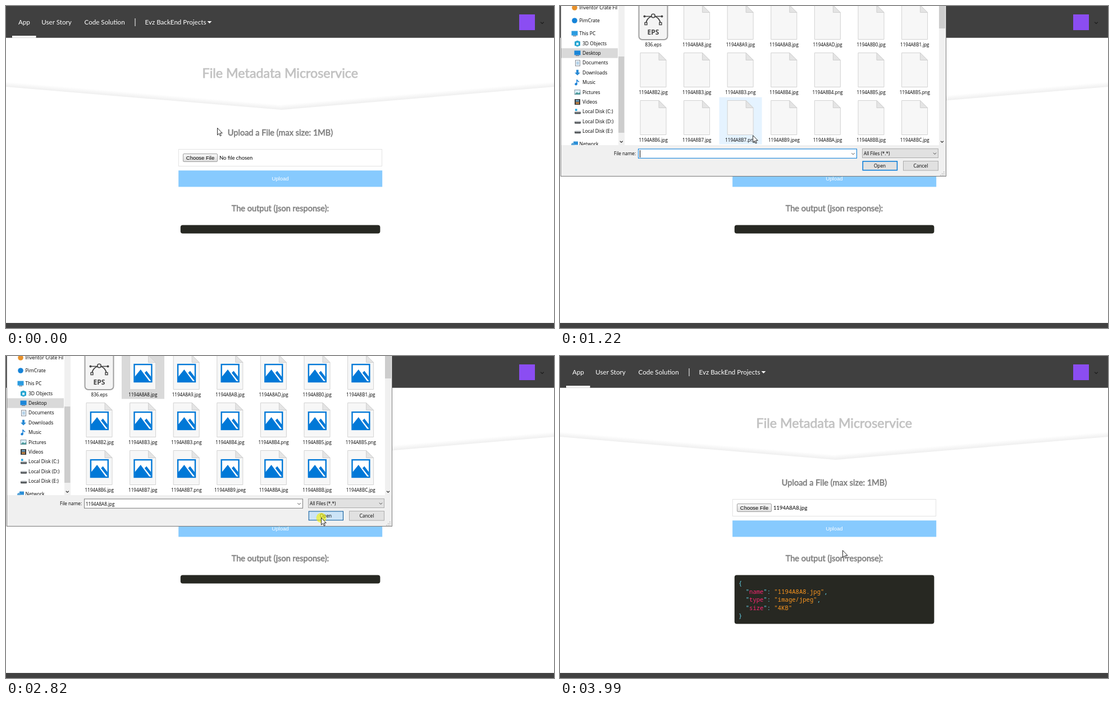
An HTML page that plays this animation: 976x574 px, repeating every 4690 ms.

```html
<!DOCTYPE html>
<html lang="en">
<head>
<meta charset="utf-8">
<title>File Metadata Microservice</title>
<style>
html, body { margin: 0; width: 100%; height: 100%; overflow: hidden; background: #fff; }
svg { display: block; width: 976px; height: 574px; }
text { white-space: pre; }
.lato { font-family: Lato, sans-serif; }
.arial { font-family: "Liberation Sans", Arial, sans-serif; }
.ui { font-family: "Open Sans", "Noto Sans", sans-serif; }
.mono { font-family: "Noto Sans Mono", "DejaVu Sans Mono", monospace; }
.mid { text-anchor: middle; }
</style>
</head>
<body>
<svg id="stage" viewBox="0 0 976 574"></svg>
<script>
const LOOP = 4690;
const BLUE = '#0078d7';

const rect = (x, y, w, h, fill, extra = '') =>
  `<rect x="${x}" y="${y}" width="${w}" height="${h}" fill="${fill}" ${extra}/>`;
const box = (x, y, w, h, fill, stroke, extra = '') =>
  rect(x + .5, y + .5, w - 1, h - 1, fill, `stroke="${stroke}" ${extra}`);
const path = (d, fill, extra = '') => `<path d="${d}" fill="${fill}" ${extra}/>`;
const line = (d, stroke, width = 1) => path(d, 'none', `stroke="${stroke}" stroke-width="${width}"`);
const dot = (x, y, r, fill, extra = '') => `<circle cx="${x}" cy="${y}" r="${r}" fill="${fill}" ${extra}/>`;
const text = (x, y, str, size, cls, fill = '#000', extra = '') =>
  `<text x="${x}" y="${y}" font-size="${size}" class="${cls}" fill="${fill}" ${extra}>${str}</text>`;
const group = (id, body, extra = '') => `<g id="${id}" ${extra}>${body}</g>`;
const heavy = (color, width) => `stroke="${color}" stroke-width="${width}"`;
const chevron = (x, y, s, color, width = 1) =>
  line(`M${x - s} ${y - s / 2}l${s} ${s}l${s} ${-s}`, color, width);

function navBar() {
  const items = [[22, 'App'], [63.3, 'User Story'], [139.5, 'Code Solution'], [247.5, 'Evz BackEnd Projects']];
  return rect(0, 0, 976, 56.7, '#404040') +
    items.map(([x, label]) => text(x, 32.5, label, 11.64, 'lato', '#fff')).join('') +
    rect(11, 53, 42.5, 3.7, '#fff') + rect(229.5, 22, 1, 14, '#fff') +
    path('M358.6 27h7.8l-3.9 4z', '#fff') +
    rect(914, 15, 28, 28, '#8b4df2') + chevron(955, 30, 2.8, '#1c1c1c', 1.3);
}

function banner() {
  const shade = (x0, y0, x1, y1, dx) =>
    path(`M${x0} ${y0}L${x1} ${y1}v-10L${x0} ${y0 - 10}z`, `url(#${dx})`);
  const grad = (id, x, y, nx) =>
    `<linearGradient id="${id}" gradientUnits="userSpaceOnUse" x1="${x}" y1="${y}" x2="${x + nx}" y2="${y - 9}">
     <stop offset="0" stop-color="#efefef"/><stop offset="1" stop-color="#fff"/></linearGradient>`;
  return grad('shadeL', 0, 144, .75) + grad('shadeR', 976, 144, -.75) +
    shade(0, 144, 491, 185, 'shadeL') + shade(491, 185, 976, 144, 'shadeR') +
    text(488.3, 127.5, 'File Metadata Microservice', 23.3, 'lato mid', '#c2c2c2', heavy('#c2c2c2', .75));
}

function json() {
  const cyan = '#66d9ef';
  const span = (s, c) => `<tspan fill="${c}">${s}</tspan>`;
  const pair = (key, value, end) =>
    '  ' + span('"', cyan) + span(key, '#f92672') + span('": ', cyan) + span(`"${value}"`, '#fd971f') + span(end, cyan);
  const rows = [span('{', cyan), pair('name', '1194A8A8.jpg', ','), pair('type', 'image/jpeg', ','),
    pair('size', '4KB', ''), span('}', cyan)];
  return rows.map((row, i) => text(318, 409 + i * 14.5, row, 10.58, 'mono')).join('');
}

function form() {
  const grey = '#808080';
  const heading = (y, label) => text(488.5, y, label, 14.55, 'lato mid', grey, heavy(grey, .6));
  return heading(230.5, 'Upload a File (max size: 1MB)') +
    box(307, 255, 363, 31, '#fff', '#e3e3e3') +
    `<linearGradient id="face" x2="0" y2="1"><stop stop-color="#f8f8f8"/><stop offset="1" stop-color="#dcdcdc"/></linearGradient>` +
    box(315, 263, 62, 15, 'url(#face)', '#a0a0a0', 'id="choose" rx="1.5"') +
    text(346, 274, 'Choose File', 9.45, 'arial mid') +
    text(380, 274, '', 9.45, 'lato', '#000', 'id="chosen"') +
    rect(307.2, 293.2, 363, 29.2, '#87cafe', 'id="upload"') +
    text(488.5, 310.7, 'Upload', 9.45, 'arial mid', '#fff') +
    heading(366, 'The output (json response):') +
    rect(310.8, 390.5, 355.6, 14.9, '#272822', 'id="output" rx="4"') + group('json', json());
}

const tileX = col => 128.4 + col * 77.6;
const tileY = row => -8 + row * 85.3;

function pageIcon(x, y) {
  return path(`M${x} ${y}h33l13 13v48h-46z`, '#f7f7f7', 'stroke="#d2d2d2"') +
    path(`M${x + 33} ${y}v13h13z`, '#e4e4e4', 'stroke="#cfcfcf"');
}

function picture(x, y) {
  return rect(x, y, 33.3, 33.3, BLUE) + rect(x + 2.4, y + 2.4, 28.5, 28.5, '#fff') +
    path(`M${x + 2} ${y + 23}l10.5-13l15.5 21h-26z`, BLUE) +
    path(`M${x + 19.5} ${y + 16}l3.5-3.5l8 10.5v7.5z`, BLUE);
}

function epsIcon() {
  const ink = '#444';
  const node = (x, y) => rect(x - 2, y - 2, 4, 4, '#f4f4f4', `stroke="${ink}" stroke-width="1.4"`);
  return box(140, -6, 52, 66.5, '#f4f4f4', '#a0a0a0', 'rx="6" stroke-width="2"') +
    line('M150 18.5H182M153 31C154 24 159 18.5 166 18.5S178 24 179 31', ink, 1.7) +
    dot(150.5, 18.5, 2, ink) + dot(181.5, 18.5, 2, ink) +
    node(153, 31.5) + node(179, 31.5) +
    dot(166, 17.5, 3.2, '#f4f4f4', `stroke="${ink}" stroke-width="1.6"`) +
    text(166, 51, 'EPS', 12, 'ui mid', ink, 'font-weight="700"');
}

function fileGrid() {
  const names = 'A8 A9 AB AD B0 B1 B2 B3 B3.png B4 B4.png B5 B5.png B6 B7 B7.png B9.jpeg BA BB BC'.split(' ')
    .map(n => '1194A8' + (n.includes('.') ? n : n + '.jpg'));
  let icons = epsIcon(), pictures = '';
  ['836.eps', ...names].forEach((name, i) => {
    const col = i % 7, row = Math.floor(i / 7);
    const x = 143 + col * 77.6, y = -1.5 + row * 85;
    if (i) {
      icons += pageIcon(x, y);
      pictures += picture(x + 6.7, y + 15.4);
    }
    icons += text(x + 23.2, y + 73.6, name, 8.05, 'ui mid');
  });
  return rect(tileX(1), tileY(0), 76, 84.5, '#cce8ff', 'id="selected"') +
    rect(0, 0, 76, 84, '#e5f3ff', 'id="hover"') + icons + group('pictures', pictures);
}

function sidebar() {
  const icons = {
    ball: (x, y, c) => dot(x, y, 4.8, c),
    screen: (x, y, c) => rect(x - 5.5, y - 4.5, 11, 8, c) + rect(x - 3, y + 4, 6, 1, '#667'),
    cube: (x, y, c) => path(`M${x - 5} ${y - 3}l5-2l5 2v7l-5 2l-5-2z`, c) + rect(x - 2, y - 1, 4, 4, '#d8f2fc'),
    sheet: (x, y) => box(x - 4, y - 5, 9, 11, '#fff', '#7c8794') + line(`M${x - 2} ${y - 1.5}h5m-5 2h5m-5 2h5`, '#4a90c8', .8),
    arrow: (x, y, c) => path(`M${x - 2} ${y - 5}h4v5h3l-5 5l-5-5h3z`, c),
    note: (x, y, c) => line(`M${x - 1} ${y + 3}v-8q1 3 4 4`, c, 1.5) + dot(x - 2.5, y + 3, 2.2, c),
    photo: (x, y, c) => box(x - 5.5, y - 4.5, 11, 9, '#d9effa', '#8a97a0') + path(`M${x - 5} ${y + 4}l4-4l3 2l3-2v4z`, c),
    film: (x, y, c) => rect(x - 5, y - 5, 10, 10, '#3a3a3a') + rect(x - 3, y - 3.5, 6, 3, c) + rect(x - 3, y + .5, 6, 3, '#c98a4a'),
    disk: (x, y) => rect(x - 5, y, 11, 4, '#55595c', 'rx="1"') + rect(x - 4, y - 1, 9, 2, '#c8ccd0'),
    system: (x, y, c) => icons.disk(x, y) + rect(x - 4, y - 5, 3.5, 3.5, c),
    net: (x, y, c) => rect(x - 2, y - 4.5, 8, 6, c) + dot(x - 3, y + 1, 3, '#5aa4d8')
  };
  const rows = [
    ['Inventor Crate Fil', 3, 'ball', '#e8912a', 1], ['PimCrate', 26, 'ball', '#1583d8', 1],
    ['This PC', 49, 'screen', '#2b9be0', 1], ['3D Objects', 66.5, 'cube', '#27a5d0'],
    ['Desktop', 84, 'screen', '#1b86d8'], ['Documents', 101.3, 'sheet'],
    ['Downloads', 118.8, 'arrow', '#2a8ad4'], ['Music', 136.2, 'note', '#1a80d6'],
    ['Pictures', 153.6, 'photo', '#4a9a9a'], ['Videos', 171, 'film', '#6a9fc0'],
    ['Local Disk (C:)', 188.4, 'system', '#21a6e0'], ['Local Disk (D:)', 205.8, 'disk'],
    ['Local Disk (E:)', 223.2, 'disk'], ['Network', 246, 'net', '#2b8fd8', 1]
  ];
  return rect(2, 75.3, 101, 17.4, '#d9d9d9') +
    rows.map(([label, y, icon, color, top]) =>
      icons[icon](top ? 26 : 31, y, color) + text(top ? 34.5 : 40, y + 3, label, 8.5, 'ui')).join('') +
    rect(104, 0, 11, 248, '#f0f0f0') + rect(104, 90, 10.5, 136, '#cdcdcd') + chevron(109.3, 242, 2.5, '#333', 1.2);
}

function controls() {
  return text(96, 266, 'File name:', 8.2, 'ui') +
    box(139, 254.4, 390, 17.4, '#fff', BLUE, 'id="field"') + chevron(522, 263.5, 2.6, '#444') +
    text(142, 266.5, '1194A8A8.jpg', 8.05, 'ui', '#000', 'id="typed"') +
    rect(142, 257, 1, 13, '#000', 'id="caret"') +
    box(538, 254, 136, 17, '#e1e1e1', '#adadad') + chevron(667.5, 263, 2.6, '#444') +
    text(541, 266, 'All Files (*.*)', 8.2, 'ui') +
    rect(539.3, 276.9, 61.2, 15.8, '#e1e1e1', `stroke="${BLUE}" stroke-width="1.5" id="open"`) +
    text(569.5, 288, 'Open', 8.25, 'ui mid') +
    box(611, 276, 63, 17.6, '#e1e1e1', '#adadad') + text(642.5, 288, 'Cancel', 8.35, 'ui mid') +
    [[0, 0], [0, 3], [0, 6], [-3, 3], [-3, 6], [-6, 6]].map(([x, y]) => rect(683 + x, 295 + y, 1.5, 1.5, '#b5b5b5')).join('');
}

function dialog() {
  const blanks = rect(96, 257, 40, 11, '#fff') + rect(139, 254, 390, 18, '#fff') +
    rect(538, 254, 136, 17, '#fff') + rect(538, 275, 64, 19, '#fff') +
    rect(610, 275, 64, 19, '#fff') + rect(674, 291, 12, 12, '#fff');
  const scroll = rect(675, 0, 11.5, 248, '#f0f0f0') + rect(675, 0, 11, 40, '#cdcdcd') + chevron(680.5, 242, 2.5, '#333', 1.2);
  return rect(1, -2, 687, 306, '#fff') + group('sidebar', sidebar()) + group('files', fileGrid() + scroll) +
    rect(2, 248, 685, 55, '#f0f0f0') + group('blanks', blanks) + group('controls', controls()) +
    box(1, -3, 687, 307, 'none', '#777');
}

document.getElementById('stage').innerHTML =
  rect(0, 0, 976, 574, '#fff') + navBar() + banner() + form() + rect(0, 565, 976, 9, '#404040') +
  group('dialog', dialog()) +
  group('cursor', dot(.5, .5, 9, '#f5f000', 'id="click" fill-opacity=".62"') +
    path('M.5 .5V13L3.4 10.3L5.4 14.7L7.3 13.9L5.4 9.6H9.2Z', '#fff', 'stroke="#111" stroke-width=".9"'));

const el = Object.fromEntries([...document.querySelectorAll('svg [id]')].map(n => [n.id, n]));
const show = (name, on) => el[name].setAttribute('visibility', on ? 'inherit' : 'hidden');
const set = (name, attrs) => Object.entries(attrs).forEach(([k, v]) => el[name].setAttribute(k, v));

const ticks = [0, 70, 140, 220, 290, 360, 440, 510, 830, 900, 980, 1060, 1140, 1220, 1300,
  1370, 1450, 1530, 1610, 1680, 1750, 1820, 1900, 1980, 2060, 2130, 2210, 2280, 2360,
  2440, 2520, 2600, 2670, 2740, 2820, 2900, 2990, 3140, 3220, 3300, 3370, 3450, 3520, 3600,
  3680, 3760, 3840, 3910, 3990];

// Pointer path: time, x, y.
const route = [[0, 376, 217], [510, 357, 268], [1140, 357, 268], [1610, 275.5, 46], [1820, 262, 43],
  [1900, 262, 43], [2060, 355.5, 223], [2360, 432, 252], [2740, 561, 288], [2900, 561, 288],
  [2990, 560, 292], [3140, 560, 292], [3370, 528, 331], [3600, 506, 312], [3760, 506, 312], [3990, 503, 346]];

function pointerAt(t) {
  const i = route.findIndex(p => p[0] > t);
  if (i < 0) return route[route.length - 1].slice(1);
  const [a, b] = [route[i - 1], route[i]];
  const k = (t - a[0]) / (b[0] - a[0]);
  return [1, 2].map(n => a[n] + (b[n] - a[n]) * k);
}

function draw(time) {
  const t = ticks.filter(v => v <= time).pop();
  const within = (a, b) => t >= a && t < b;
  const [x, y] = pointerAt(t);
  set('cursor', { transform: `translate(${x} ${y})` });
  show('click', within(440, 510) || within(1820, 1900) || within(2740, 2900) || within(3600, 3760));

  const open = within(830, 2900);
  show('dialog', open);
  show('blanks', within(900, 980));
  show('controls', t >= 980 && open);
  show('sidebar', t >= 1060 && open);
  show('files', t >= 1140 && open);
  show('pictures', t >= 1370 && open);

  const picked = t >= 1820, pressed = t >= 2740;
  const col = Math.floor((x - tileX(0)) / 77.6), row = Math.floor((y - tileY(0)) / 85.3);
  const overTile = y < 247 && col >= 0 && col < 7 && !(picked && col === 1 && row === 0);
  show('hover', within(1140, 2900) && overTile);
  set('hover', { x: tileX(col), y: tileY(row) });
  show('selected', picked && open);
  set('selected', { fill: pressed ? '#d9d9d9' : '#cce8ff', stroke: pressed ? 'none' : '#99d1ff' });
  show('typed', picked && open);
  show('caret', within(980, 1820));
  set('field', { stroke: t < 1900 ? BLUE : '#7a7a7a' });
  set('open', pressed ? { fill: '#cce4f7', stroke: '#005499', 'stroke-width': 1 }
                      : { fill: '#e1e1e1', stroke: BLUE, 'stroke-width': 1.5 });

  set('choose', { stroke: within(360, 3140) ? '#7c7c7c' : '#a0a0a0' });
  el.chosen.textContent = t < 2990 ? 'No file chosen' : '1194A8A8.jpg';
  const overUpload = t >= 3140 && y >= 293 && y < 322;
  set('upload', { fill: overUpload ? '#6fbefb' : '#87cafe' });
  const done = t >= 3840;
  set('output', { height: done ? 87 : 14.9 });
  show('json', done);
}

const start = performance.now();
function tick() {
  draw((performance.now() - start) % LOOP);
  requestAnimationFrame(tick);
}
tick();
</script>
</body>
</html>
```
